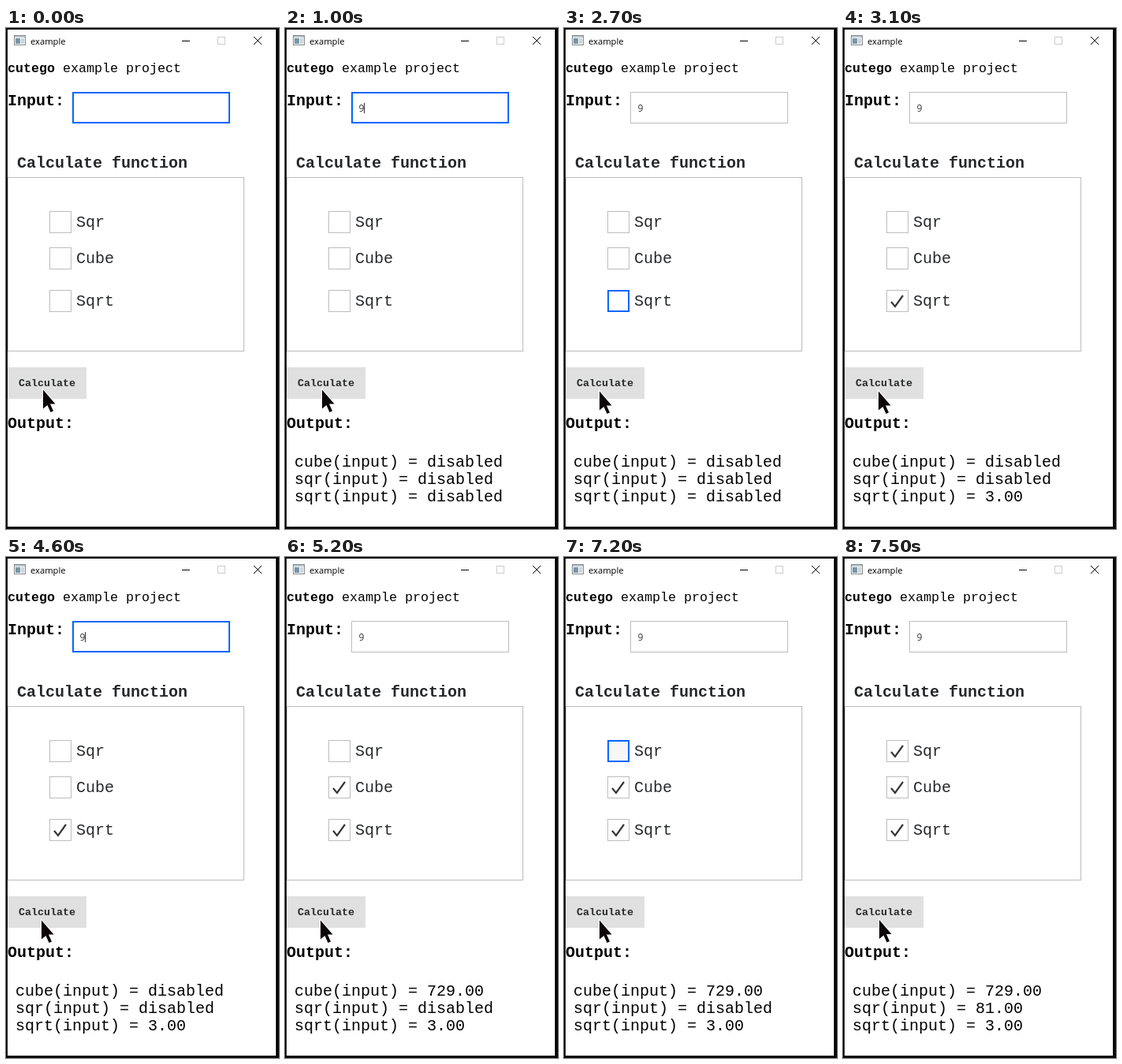
Write an HTML page that moves like this. It is 346 px wide and 635 px high and loops after 8000 ms.

```html
<!DOCTYPE html>
<html lang="en">
<head>
<meta charset="utf-8">
<title>example</title>
<style>
  html, body { margin: 0; width: 100%; height: 100%; overflow: hidden; background: #0b0809; }
  svg { display: block; }
  text { white-space: pre; font: 20px "Liberation Mono", monospace; }
  .bold { font-weight: bold; }
  .small { font: 11.2px "Open Sans", sans-serif; }
</style>
</head>
<body>
<svg id="stage" width="346" height="635" viewBox="0 0 346 635"></svg>
<script>
const LOOP = 8000;
const INK = '#26282a', DARK = '#353637', MID = '#bdbdbd', HIGHLIGHT = '#0066ff';
const BOXES = { sqr: 232, cube: 278, sqrt: 332 };

const initial = {
  value: '', focus: 'input', caret: false, checked: [], down: '',
  output: null, cursor: [47, 458.5],
};
const press = { focus: '', caret: false, down: 'button' };
const enterInput = { focus: 'input', caret: true };
const release = results => ({ down: '', output: { cube: 'disabled', sqr: 'disabled', sqrt: 'disabled', ...results } });

// Each entry changes part of the state from its time on.
const timeline = [
  [500, press],
  [700, release()],
  [800, { focus: 'input' }],
  [900, { caret: true }],
  [1000, { value: '9' }],
  [1100, press],
  [1200, release()],
  [2700, { focus: 'sqrt', cursor: [45, 460.5] }],
  [2900, { checked: ['sqrt'] }],
  [3000, press],
  [3100, release({ sqrt: '3.00' })],
  [4600, enterInput],
  [4700, { focus: 'sqrt', caret: false }],
  [4800, { focus: 'cube' }],
  [5000, { checked: ['sqrt', 'cube'] }],
  [5100, press],
  [5200, release({ sqrt: '3.00', cube: '729.00' })],
  [6700, enterInput],
  [6800, { focus: 'sqrt', caret: false }],
  [6900, { focus: 'cube' }],
  [7000, { focus: 'sqr' }],
  [7200, { down: 'sqr' }],
  [7300, { down: '', checked: ['sqrt', 'cube', 'sqr'] }],
  [7400, { ...press, cursor: [46, 460] }],
  [7500, release({ sqrt: '3.00', cube: '729.00', sqr: '81.00' })],
];

const rect = (x, y, w, h, fill) =>
  `<rect x="${x}" y="${y}" width="${w}" height="${h}" fill="${fill}"/>`;

// Border drawn inside the given bounds.
const frame = (x, y, w, h, color = MID, line = 1, fill = '#fff') =>
  rect(x, y, w, h, color) + rect(x + line, y + line, w - 2 * line, h - 2 * line, fill);

const field = (x, y, w, h, focused, fill) =>
  frame(x, y, w, h, focused ? HIGHLIGHT : MID, focused ? 2 : 1, fill);

const text = (x, y, string, { cls = '', fill = '#000', size } = {}) =>
  `<text x="${x}" y="${y}" class="${cls}" fill="${fill}"${size ? ` style="font-size:${size}px"` : ''}>${string}</text>`;

const stroke = (d, color, width = 1) =>
  `<path d="${d}" fill="none" stroke="${color}" stroke-width="${width}"/>`;

const titleBar =
  frame(10, 9, 15, 13, '#85898c', 1, '#f4f6f7') +
  rect(11, 10, 13, 2, '#b9c6ce') + rect(12, 13, 6, 7, '#7896a8') + rect(19, 13, 4, 7, '#cfd4d8') +
  text(31, 21, 'example', { cls: 'small' }) +
  rect(223, 16, 10, 1, '#000') +
  frame(268, 11, 10, 10, '#ccc') +
  stroke('M314 11L324 21M324 11L314 21', '#000');

const backdrop =
  rect(2, 2, 340, 630, '#fff') + titleBar +
  text(2, 56, '<tspan class="bold">cutego</tspan> example project', { size: 16.667 }) +
  text(2, 98, 'Input:', { cls: 'bold' }) +
  text(14, 177, 'Calculate function', { cls: 'bold', fill: INK }) +
  frame(2, 189, 300, 221) +
  text(2, 507, 'Output:', { cls: 'bold' });

function checkBox(name, y, state) {
  const label = name[0].toUpperCase() + name.slice(1);
  const fill = state.down === name ? '#f6f6f6' : '#fff';
  const tick = state.checked.includes(name)
    ? stroke(`M61 ${y + 15}L66 ${y + 21}L76 ${y + 7}`, DARK, 2.2) : '';
  return field(55, y, 28, 28, state.focus === name, fill) + tick +
    text(89, y + 20, label, { fill: INK });
}

const pointer = ([x, y]) =>
  `<path transform="translate(${x} ${y})" d="M0 0V24L5.5 19.5L9.5 28.5L13 27L9 18H15.5Z"
    fill="#0a0506" stroke="#fff" stroke-width="2" paint-order="stroke"/>`;

function draw(state) {
  const results = Object.entries(state.output || {});
  return backdrop +
    field(84, 81, 200, 40, state.focus === 'input') +
    text(93.5, 106, state.value, { cls: 'small', fill: DARK, size: 12 }) +
    (state.caret ? rect(state.value ? 100 : 94, 95, 1, 13, DARK) : '') +
    Object.entries(BOXES).map(([name, top]) => checkBox(name, top, state)).join('') +
    rect(2, 430, 100, 40, state.down === 'button' ? '#cfcfcf' : '#e0e0e0') +
    text(16, 454, 'Calculate', { cls: 'bold', fill: INK, size: 13.333 }) +
    results.map(([name, result], i) => text(12, 556 + 22 * i, `${name}(input) = ${result}`)).join('') +
    pointer(state.cursor);
}

const stage = document.getElementById('stage');
let shown = -1;

function tick(now) {
  const time = now % LOOP;
  const past = timeline.filter(([start]) => start <= time);
  if (past.length !== shown) {
    shown = past.length;
    stage.innerHTML = draw(Object.assign({}, initial, ...past.map(([, change]) => change)));
  }
  requestAnimationFrame(tick);
}
tick(0);
</script>
</body>
</html>
```
